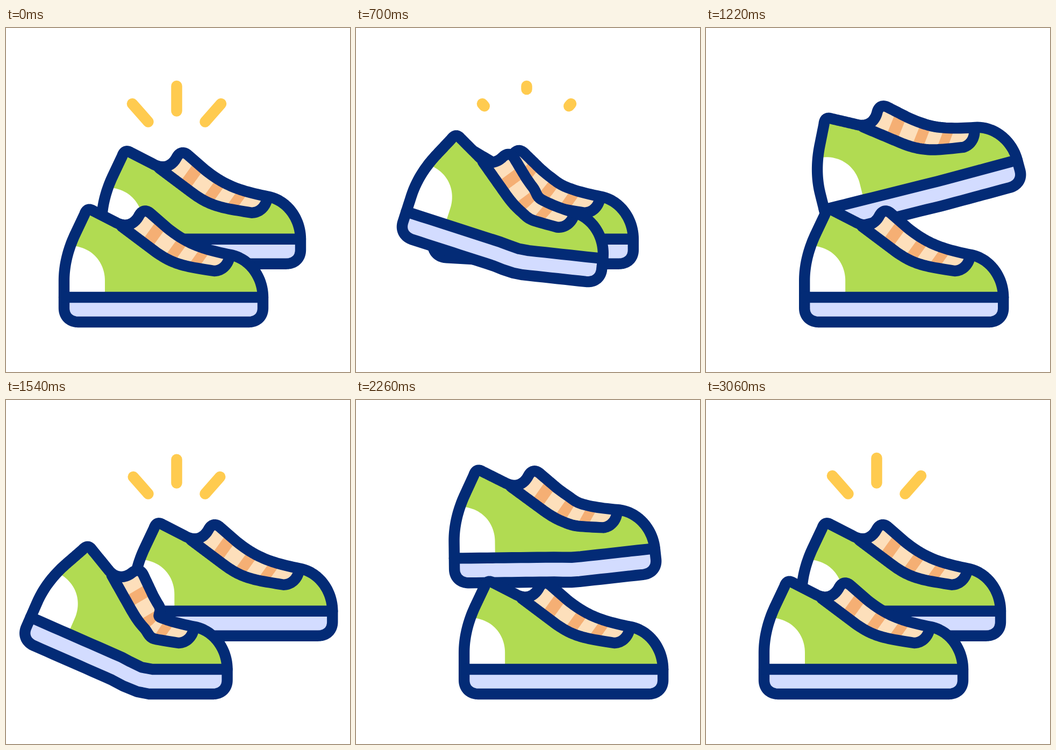
An HTML page that plays this animation: 640 px wide and 640 px high, repeating every 3.46 s.

```html
<!DOCTYPE html>
<html lang="en">
<head>
<meta charset="utf-8">
<title>Walking shoes</title>
<style>
  html, body { margin: 0; width: 100%; height: 100%; overflow: hidden; background: #fff; }
  svg { display: block; width: 100%; height: 100%; }
  .line { fill: none; stroke: #032b76; stroke-width: 20.4; stroke-linecap: round; stroke-linejoin: round; }
  .ray { stroke: #ffcb4f; stroke-width: 20.5; stroke-linecap: round; }
</style>
</head>
<body>
<svg id="stage" viewBox="0 0 640 640"></svg>
<script>
const LOOP = 3460, CYCLE = 1100, AIRTIME = 540;
const NS = 'http://www.w3.org/2000/svg';
const stage = document.getElementById('stage');

function add(parent, tag, attrs) {
  const el = document.createElementNS(NS, tag);
  for (const name in attrs) el.setAttribute(name, attrs[name]);
  return parent.appendChild(el);
}

const clamp = t => Math.min(1, Math.max(0, t));
const smooth = t => { t = clamp(t); return t * t * (3 - 2 * t); };
const mix = (a, b, t) => a + (b - a) * t;

// Shoe outline at rest, absolute M / L / C commands only
const HEEL = 'M108 501 L108 470 C108 440 116 411 128 385 L146 347 C149 338 154 335 162 340 L203 361';
const COLLAR = ' C222 372 238 366 247 350 C252 340 260 337 269 345';
const TOP = ' L300 372 C335 400 362 411 418 422';
const TOE = ' C453 429 478 463 478 501';
const SOLE = ' L478 521 C478 537 467 547 451 547 L135 547 C119 547 108 537 108 521 L108 501';
const THROAT = 'M215 369 L275 414 C310 440 330 443 387 452 C402 452 414 440 416 424';
const STRAP = THROAT + ' C362 411 335 400 300 372 L269 345 C260 337 252 340 247 350 C242 360 232 367 215 369';
const HEEL_PATCH = 'M108 501 L108 470 C108 447 113 425 121 404 L130 406 C165 412 184 440 184 470 L184 501 L108 501';
const UPPER = HEEL + COLLAR + TOP + TOE;

// Slanted stripe number i, following the sag of the strap
function stripe(i) {
  const x = 276 + 41.5 * i, y = 383 + 34 * i - 5.5 * i * i;
  const tilt = 6.5 - 1.7 * i;
  const corner = (across, along) => `${x + 9 * across - 11.2 * along} ${y + tilt * across + 15.5 * along}`;
  return `M${corner(-1, -1)} L${corner(1, -1)} L${corner(1, 1)} L${corner(-1, 1)}`;
}

const SHAPES = [
  ['#b1db52', UPPER + ' L108 501'],
  ['#fff', HEEL_PATCH],
  ['#fddfbb', STRAP],
  ...[0, 1, 2].map(i => ['#f5af74', stripe(i)]),
  ['#d3dcff', 'M108 501 L478 501' + SOLE],
  ['line', THROAT],
  ['line', UPPER + SOLE],
  ['line', 'M108 501 L478 501']
].map(([paint, d]) => ({ paint, points: flatten(d) }));

// Turns a path into a dense list of points so that it can be bent
function flatten(d) {
  const points = [];
  for (const [, cmd, args] of d.matchAll(/([MLC])([^MLC]*)/g)) {
    const n = args.trim().split(/\s+/).map(Number);
    if (cmd === 'M') { points.push(n); continue; }
    const from = points[points.length - 1];
    const curve = cmd === 'C' ? n : [...from, ...n, ...n];
    for (let i = 1; i <= 24; i++) {
      const t = cmd === 'C' ? i / 24 : i / 24, u = 1 - t;
      points.push([0, 1].map(k => cmd === 'L'
        ? mix(from[k], n[k], t)
        : u ** 3 * from[k] + 3 * u * u * t * curve[k] + 3 * u * t * t * curve[k + 2] + t ** 3 * curve[k + 4]));
    }
  }
  return points;
}

function turn(x, y, degrees) {
  const r = degrees * Math.PI / 180, c = Math.cos(r), s = Math.sin(r);
  return [x * c - y * s, x * s + y * c];
}

// Heel and toe turn around a hinge in the sole; the crease leans forward
const HINGE = [335, 491];
function place([px, py], { dx, dy, tilt, flex }) {
  const x = px - HINGE[0], y = py - HINGE[1];
  const crease = 322 - 0.17 * y;
  const w = smooth((px - crease) / 44 + 0.5);
  const heel = turn(x - 0.5 * flex, y, tilt + flex);
  const toe = turn(x, y, tilt);
  return [HINGE[0] + dx + mix(heel[0], toe[0], w), HINGE[1] + dy + mix(heel[1], toe[1], w)];
}

// Times: start of the first push, first lift-off, end of the last glide.
// reach is how far ahead the foot lands, stride how long it travels there.
const FRONT = { start: 200, lift: 480, end: 2544, reach: 113, stride: 540 };
const BACK = { start: 490, lift: 884, end: 3020, reach: 78, stride: 480 };
const PUSH = -70, FLEX = 24.6;

const glide = u => smooth(clamp(u) ** 1.2);
const push = (from, u) => ({
  dx: mix(from, PUSH, glide(u)), dy: 0, tilt: 0, flex: FLEX * smooth((u - 0.4) / 0.6)
});

// Air time p from 0 to 1: rise and drop, toe down then toe up, sole straightens
const lift = p => -112 * Math.sin(Math.PI / 2 * clamp(Math.min(p / 0.72, (1 - p) / 0.28)));
const rock = p => p < 0.45
  ? 22 * Math.sin(Math.PI * p / 0.45)
  : -18 * Math.sin(Math.PI * clamp((p - 0.45) / 0.55));
const straighten = p => FLEX * (1 - smooth((p - 0.1) / 0.6));
const travel = p => { const q = clamp((p - 0.12) / 0.88); return (q + smooth(q)) / 2; };

function poseAt({ start, lift: liftOff, end, reach, stride }, time) {
  if (time < liftOff) return push(0, clamp((time - start) / (liftOff - start)));
  const lastStep = time >= liftOff + CYCLE;
  const since = time - liftOff - (lastStep ? CYCLE : 0);
  const p = since / AIRTIME;
  const landed = liftOff + CYCLE + stride;
  const ground = lastStep
    ? { dx: mix(reach, 0, glide((time - landed) / (end - landed))), flex: 0 }
    : push(reach, (since - stride) / (CYCLE - stride));
  return {
    dx: since < stride ? mix(PUSH, reach, travel(since / stride)) : ground.dx,
    dy: lift(p),
    tilt: rock(p),
    flex: straighten(p) + ground.flex
  };
}

function makeShoe(foot, x, y) {
  const group = add(stage, 'g', { transform: `translate(${x} ${y})` });
  const paths = SHAPES.map(({ paint }) =>
    add(group, 'path', paint === 'line' ? { class: 'line' } : { fill: paint }));
  return time => {
    const pose = poseAt(foot, time);
    SHAPES.forEach(({ points }, i) => {
      const placed = points.map(p => place(p, pose).map(v => v.toFixed(2)).join(' '));
      paths[i].setAttribute('d', 'M' + placed.join('L'));
    });
  };
}

// Three rays, mirrored around the middle one
const rays = [-1, 0, 1].map(side => ({
  inner: [317.5 + 53 * side, side ? 174.5 : 154.5],
  outer: [317.5 + 82.5 * side, side ? 141 : 108],
  el: add(stage, 'line', { class: 'ray' })
}));

// Rays leave outwards after each push and grow again when the back foot lands
function drawRays(time) {
  const n = Math.floor((time + 50) / CYCLE), t = time - n * CYCLE;
  const from = n < 2 ? smooth((t - 530) / 220) : 0;
  const to = n > 0 ? 1 - (1 - clamp((t - 260) / 240)) ** 2 : 1;
  for (const { inner, outer, el } of rays) {
    ['x', 'y'].forEach((axis, k) => {
      el.setAttribute(axis + 1, mix(inner[k], outer[k], from));
      el.setAttribute(axis + 2, mix(inner[k], outer[k], to));
    });
    el.setAttribute('visibility', to - from > 0.001 ? 'visible' : 'hidden');
  }
}

const drawBack = makeShoe(BACK, 70, -108.3);
const drawFront = makeShoe(FRONT, 0, 0);

function draw(time) {
  drawRays(time);
  drawBack(time);
  drawFront(time);
}

const begin = performance.now();
function tick() {
  draw((performance.now() - begin) % LOOP);
  requestAnimationFrame(tick);
}
draw(0);
requestAnimationFrame(tick);
</script>
</body>
</html>
```
